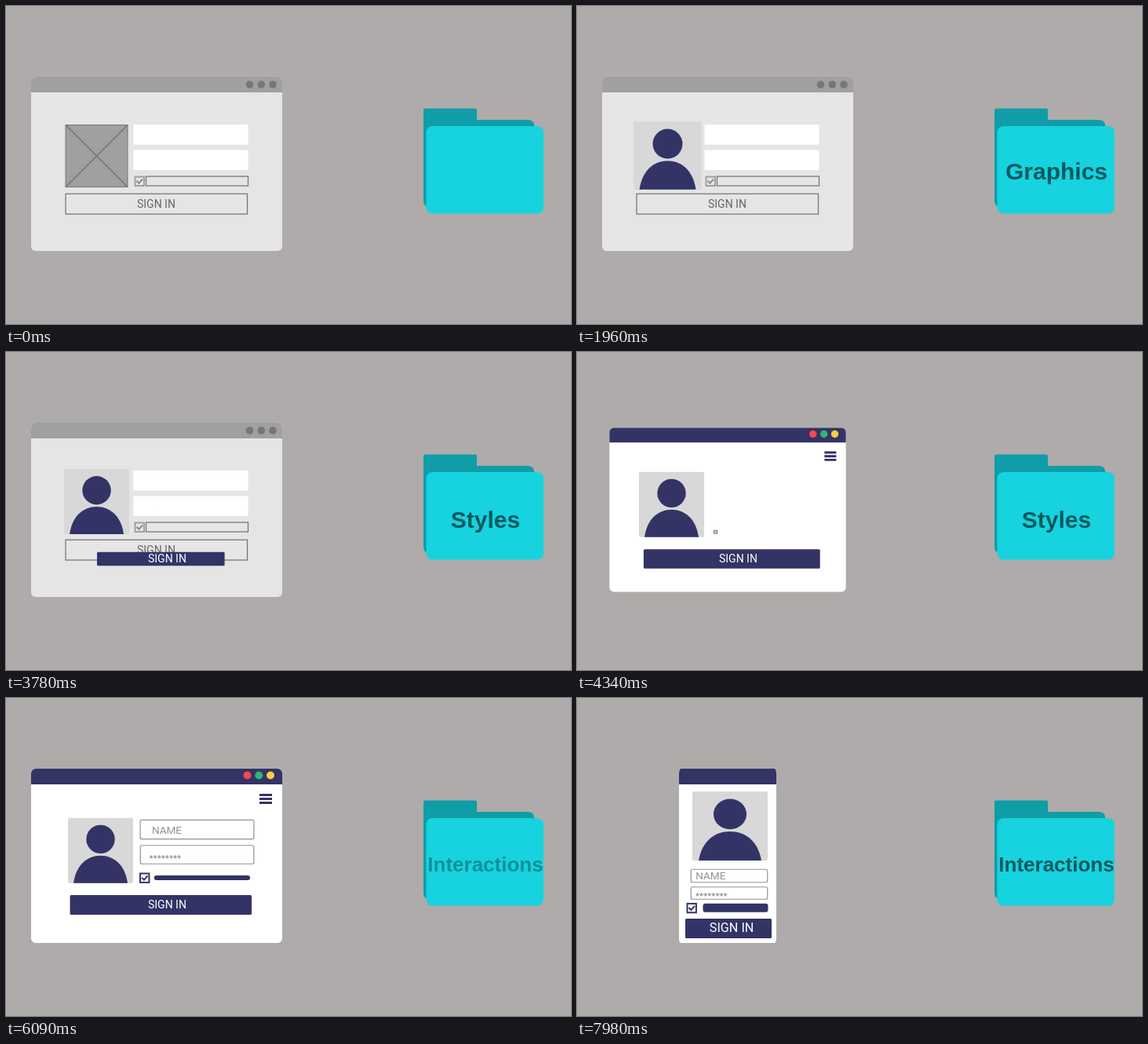
An HTML page that plays this animation: 720x405 px, repeating every 8000 ms.

```html
<!DOCTYPE html>
<html lang="en">
<head>
<meta charset="utf-8">
<title>Sign-in prototype</title>
<style>
  html, body { margin: 0; width: 100%; height: 100%; overflow: hidden; background: #afabaa; }
  svg { display: block; width: 100%; height: 100%; }
  text { font-family: Roboto, sans-serif; }
  .label { font: bold 30px "Liberation Sans", Arial, sans-serif; fill: #08595f; text-anchor: middle; }
  .line { fill: none; stroke: #707070; stroke-width: 1.2; }
  .field { fill: #fff; stroke: #929292; stroke-width: 1.2; }
  .navy { fill: #333366; }
</style>
</head>
<body>
<svg viewBox="0 0 720 405">
  <defs>
    <path id="bar" d="M-160-91v-14a6 6 0 0 1 6-6h308a6 6 0 0 1 6 6v14z"/>
    <path id="tick" d="M-3.6-.6L-.8 2.4L3.8-2.8" fill="none" stroke-width="2"/>
    <g id="folder">
      <path fill="#0f9da7" d="M532 132.500q0-2 2-2h64q2 0 2 2v12.500h65q8 0 8 8v103h-133q-8 0-8-8z"/>
      <rect x="535.5" y="153" width="149.500" height="111.500" rx="8" fill="#16d3df"/>
    </g>
  </defs>

  <g id="wireframe">
    <g transform="translate(192 201)">
      <rect x="-160" y="-111" width="320" height="222" rx="6" fill="#e5e5e5"/>
      <use href="#bar" fill="#a0a0a0"/>
    </g>
    <g fill="#767676">
      <circle cx="310.500" cy="100" r="4.800"/><circle cx="325.300" cy="100" r="4.800"/><circle cx="340" cy="100" r="4.800"/>
    </g>
    <rect x="76" y="151.500" width="79" height="79" fill="#a0a0a0" stroke="#767676"/>
    <path class="line" d="M76 151.500l79 79m0-79l-79 79"/>
    <path fill="#fff" d="M162.500 151h146v25.500h-146zm0 32.500h146v25.500h-146z"/>
    <rect x="164.500" y="217.500" width="11.500" height="11.500" fill="none" stroke="#a0a0a0" stroke-width="2"/>
    <use href="#tick" x="170.200" y="223.300" stroke="#8c8c8c"/>
    <rect class="line" x="178.500" y="217" width="130" height="12"/>
    <rect class="line" x="76" y="239.200" width="231.500" height="25.800"/>
    <text x="167" y="257" font-size="14" fill="#666">SIGN IN</text>
  </g>

  <g id="panel">
    <rect x="-160" y="-111" width="320" height="222" rx="6" fill="#fff"/>
    <use href="#bar" class="navy"/>
  </g>
  <g id="controls">
    <circle cx="115.500" cy="-102.500" r="5" fill="#f8484c"/>
    <circle cx="130.300" cy="-102.500" r="5" fill="#2fb574"/>
    <circle cx="145" cy="-102.500" r="5" fill="#fbcb43"/>
    <path class="navy" d="M131-79h16v3h-16zm0 5h16v3h-16zm0 5h16v3h-16z"/>
  </g>

  <rect id="name" class="field" rx="2"/>
  <text id="nameText" font-size="13.500" fill="#929292">NAME</text>
  <rect id="password" class="field" rx="2"/>
  <text id="passwordText" font-size="11.800" fill="#808080">********</text>
  <g id="check">
    <rect x="-5.700" y="-5.700" width="11.400" height="11.400" fill="#fff" stroke="#333366" stroke-width="2"/>
    <use href="#tick" stroke="#333366"/>
  </g>
  <rect id="remember" class="navy" rx="3"/>

  <g id="avatar">
    <rect x="-41.500" y="-41.500" width="83" height="83" rx="2" fill="#d8d8d8"/>
    <circle class="navy" cy="-14.300" r="18.200"/>
    <path class="navy" d="M-34.500 41.500C-31 18-17 6.500 0 6.500S31 18 34.500 41.500z"/>
  </g>
  <rect id="button" class="navy" rx="1.500"/>
  <text id="buttonText" fill="#fff">SIGN IN</text>

  <use href="#folder"/>
  <g id="flying"><use href="#folder" x="-608.500" y="-197.500"/></g>
  <text id="graphics" class="label" x="611" y="221">Graphics</text>
  <text id="styles" class="label" x="611" y="224">Styles</text>
  <text id="interactions" class="label" x="611" y="221" style="font-size:26px">Interactions</text>
</svg>

<script>
const LOOP = 8000, FLIGHT = 705, FLIGHTS = [580, 2735, 6429], NARROW = 7134;

const $ = id => document.getElementById(id);
const set = (id, attrs) => {
  for (const key in attrs) $(id).setAttribute(key, attrs[key]);
};
const progress = (t, from, to) => Math.min(1, Math.max(0, (t - from) / (to - from)));
const mix = (a, b, k) => a + (b - a) * k;
const mixAll = (a, b, k) => a.map((v, i) => mix(v, b[i], k));

// Linear growth that reaches 1 at `end`, then a decaying bounce.
function spring(t, end, ramp = 400, amp = 0.25) {
  const u = (t - end) / 1000;
  return u < 0 ? Math.max(0, 1 + u * 1000 / ramp)
               : 1 + amp * Math.sin(4 * Math.PI * u) * Math.exp(-4 * u);
}

function place(id, x, y, sx, sy = sx, opacity = 1) {
  set(id, { transform: `translate(${x} ${y}) scale(${sx} ${sy})`, opacity: sx > 0 ? opacity : 0 });
}

function box(id, [cx, cy, w, h], sx, sy = sx) {
  set(id, { x: cx - w * sx / 2, y: cy - h * sy / 2, width: w * sx, height: h * sy, opacity: sx > 0 ? 1 : 0 });
}

function write(id, [x, y], opacity, size) {
  set(id, { x, y, opacity: Math.min(1, opacity) });
  if (size) set(id, { 'font-size': size });
}

function drawWindow(t) {
  const narrow = 1 - (1 - progress(t, NARROW, LOOP)) ** 5;
  const open = spring(t, 3986, 206);
  const name = spring(t, 5038), password = spring(t, 4870);
  const remember = spring(t, 4740), check = spring(t, 4600), button = spring(t, 3900);

  set('wireframe', { opacity: t < 4020 ? 1 : 0 });
  place('panel', 192, 201, open * mix(1, 124 / 320, narrow), open);
  place('controls', 192, 201, open, open, 1 - progress(t, 7200, 7400));

  box('name', mixAll([243.5, 167.5, 144.5, 24], [194, 226.5, 97.5, 16.5], narrow), name);
  write('nameText', mixAll([186, 173.3], [151.3, 231.4], narrow), name);
  box('password', mixAll([243.5, 199.5, 144.5, 23.5], [194, 248.5, 97.5, 15.5], narrow), password);
  write('passwordText', mixAll([182.5, 207.5], [151, 256], narrow), password);

  place('check', ...mixAll([176.7, 229.2], [146.2, 267.6], narrow), check);
  const [left, middle, width, height] = mixAll([188.7, 229, 122.5, 6], [160.5, 267.3, 83, 11], narrow);
  box('remember', [left + width * remember / 2, middle, width, height], remember, Math.min(1, remember));

  box('button', mixAll([197.3, 263.5, 231.5, 25], [193, 293.5, 110, 25], narrow), button);
  write('buttonText', mixAll([181, 268], [168.8, 298], narrow), button * 2, mix(14, 16.2, narrow));

  const pop = spring(t, 1391, 172, 0.55);
  const moved = mixAll([115.5, 190.5], [120.5, 194.2], progress(t, 3780, 3986));
  place('avatar', ...mixAll(moved, [195, 163], narrow),
    pop * mix(1, 96 / 83, narrow), pop * mix(1, 88 / 83, narrow));
}

function drawFolder(t) {
  const start = FLIGHTS.find(s => t >= s && t < s + FLIGHT);
  const size = start === undefined ? 0 : 1 - (t - start) / FLIGHT;
  place('flying', mix(198, 608.5, size), mix(211.7, 197.5, size), size, size, Math.sqrt(size));

  set('graphics', { opacity: progress(t, 35, 420) - progress(t, 2000, 2190) });
  set('styles', { opacity: progress(t, 2190, 2575) - progress(t, 5700, 5885) });
  set('interactions', { opacity: progress(t, 5885, 6270) });
}

function draw(now) {
  const t = now % LOOP;
  drawWindow(t);
  drawFolder(t);
}

const began = performance.now();
function tick(now) {
  draw(Math.max(0, now - began));
  requestAnimationFrame(tick);
}
draw(0);
requestAnimationFrame(tick);
</script>
</body>
</html>
```
